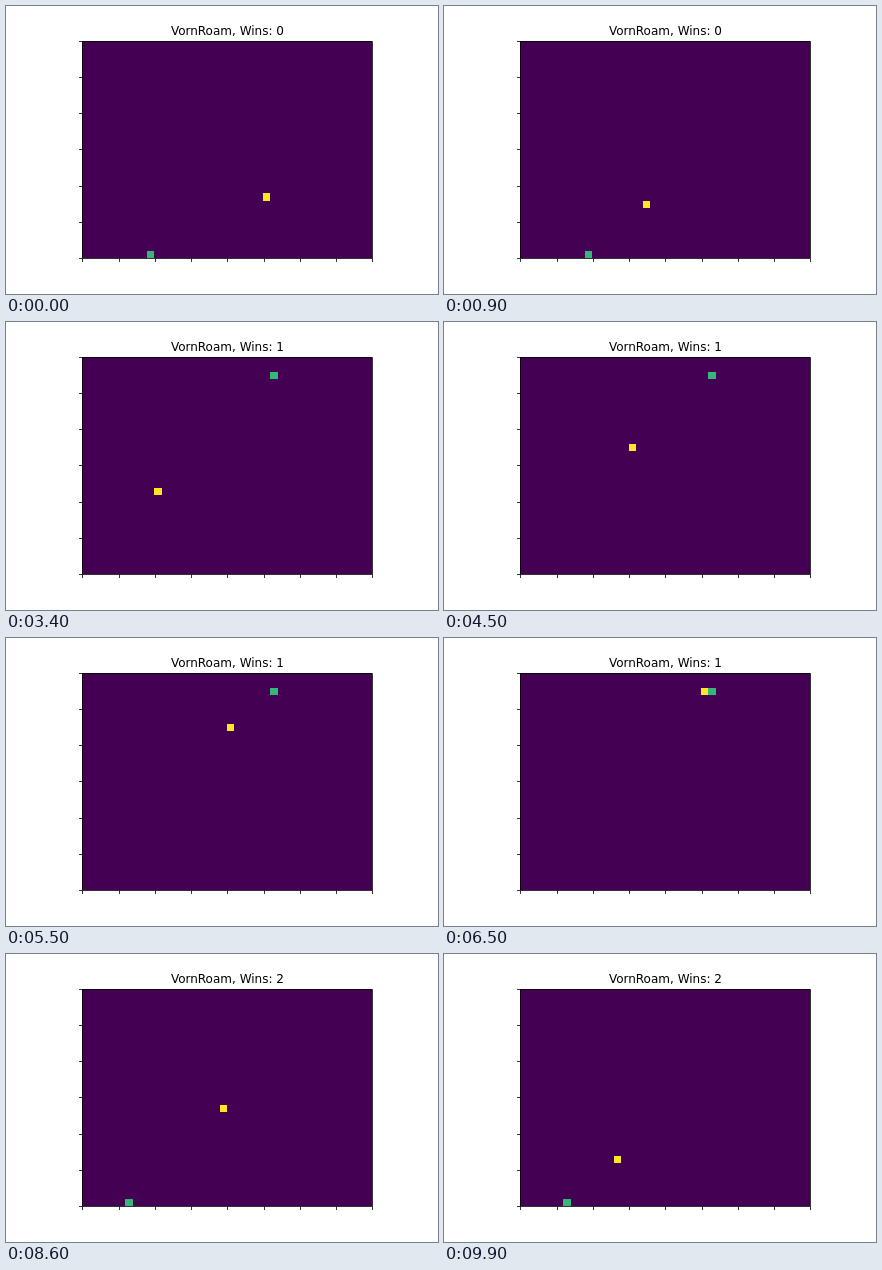
Animation, 432 px wide and 288 px high, one loop 10 s. Source, as an HTML page:

```html
<!DOCTYPE html>
<html lang="en">
<head>
<meta charset="utf-8">
<title>Grid walk</title>
<style>
  html, body { margin: 0; width: 100%; height: 100%; overflow: hidden; background: #fff; }
  svg { display: block; }
  text { font: 12px "DejaVu Sans", sans-serif; text-anchor: middle; }
  #axes { fill: none; stroke: #000; stroke-width: .8; }
</style>
</head>
<body>
<svg width="432" height="288" viewBox="0 0 432 288">
  <rect x="76" y="35" width="290" height="217" fill="#440154"/>
  <rect id="goal" fill="#35b779"/>
  <rect id="agent" fill="#fde725"/>
  <path id="axes"/>
  <text id="title" x="221.4" y="29"></text>
</svg>
<script>
const FRAME = 100, LOOP = 10000, CELL = 7.248, TICK = 36.24;
const $ = id => document.getElementById(id);

// Each round: first step, starting cell and goal cell.
const rounds = [
  { first: 0, start: [25, 21], goal: [9, 29] },
  { first: 24, start: [10, 28], goal: [26, 2] },
  { first: 66, start: [25, 2], goal: [6, 29] }
];

// Walk one cell at a time along the longer remaining axis; ties go vertical.
function walk([x, y], [gx, gy], steps) {
  while (steps-- > 0) {
    const dx = gx - x, dy = gy - y;
    if (Math.abs(dx) > Math.abs(dy)) x += Math.sign(dx);
    else y += Math.sign(dy);
  }
  return [x, y];
}

function place(rect, [col, row]) {
  const edgeX = c => Math.round(76 + CELL * c);
  const edgeY = r => Math.min(252, Math.round(35.1 + CELL * r));
  const x = edgeX(col), y = edgeY(row);
  rect.setAttribute("x", x);
  rect.setAttribute("y", y);
  rect.setAttribute("width", edgeX(col + 1) - x);
  rect.setAttribute("height", edgeY(row + 1) - y);
}

function drawAxes() {
  let d = "M76.5 35.5H366.5V252.5H76.5Z";
  for (let k = 0; k <= 8; k++) d += `M${Math.round(76.44 + TICK * k) + .5} 252.5v3.5`;
  for (let k = 0; k <= 6; k++) d += `M76.5 ${Math.round(252 - TICK * k) + .5}h-3.5`;
  $("axes").setAttribute("d", d);
}

let shown = -1;
function tick() {
  const step = Math.floor(performance.now() % LOOP / FRAME);
  if (step !== shown) {
    shown = step;
    const wins = rounds.filter(r => r.first <= step).length - 1;
    const { first, start, goal } = rounds[wins];
    place($("goal"), goal);
    place($("agent"), walk(start, goal, step - first));
    $("title").textContent = `VornRoam, Wins: ${wins}`;
  }
  requestAnimationFrame(tick);
}

drawAxes();
tick();
</script>
</body>
</html>
```
